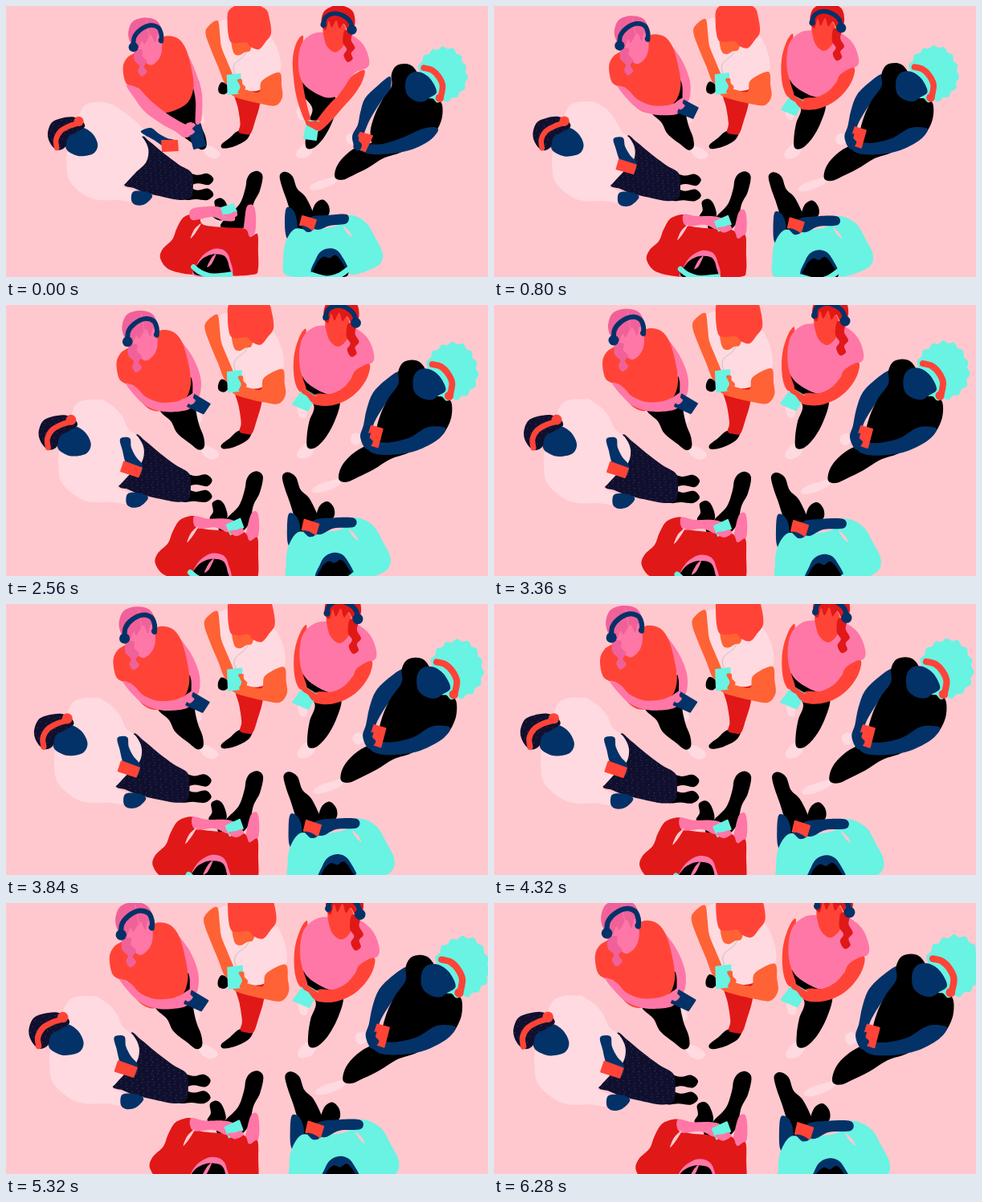
Recreate the animation shown at these times as an HTML page with a canvas. Size 600 by 338 pixels, loop 6320 ms.

```html
<!DOCTYPE html>
<html lang="en">
<head>
<meta charset="utf-8">
<title>Circle of friends</title>
<style>
html, body { margin: 0; width: 100%; height: 100%; overflow: hidden; background: #ffc8ce; }
canvas { display: block; width: 100vw; height: 100vh; }
</style>
</head>
<body>
<canvas id="stage" width="600" height="338"></canvas>
<script>
const ctx = document.getElementById('stage').getContext('2d');
const LOOP = 6320, STEP = 40, MID = 3.36, SPAN = 2.92;
const BG = '#ffc8ce', BLUSH = '#ffdae0', CORAL = '#ff4437', ORANGE = '#ff6234',
  RED = '#e11818', PINK = '#ff77a6', ROSE = '#f0619a', NAVY = '#033268',
  INK = '#10102e', AQUA = '#68f3e3', BLACK = '#000';

let fig, raise; // current figure, progress of the arms (0..1)

const read = s => s.trim().split(/\s+/).map(p => p.split(',').map(Number));

// Stage position at the start of the loop -> figure space
function settle([x, y]) {
  const u = -MID / SPAN, s = 1 + fig.zoom * u;
  return [fig.x + (x - fig.x - fig.dx * u) / s, fig.y + (y - fig.y - fig.dy * u) / s];
}

function points(end, start) {
  const b = read(end);
  if (!start) return b;
  const a = read(start).map(settle);
  return b.map((p, i) => p.map((v, j) => a[i][j] + (v - a[i][j]) * raise));
}

function trace(p, closed) {
  const n = p.length;
  const at = i => closed ? p[(i + n) % n] : p[Math.max(0, Math.min(n - 1, i))];
  ctx.beginPath();
  ctx.moveTo(...p[0]);
  for (let i = 0; i < (closed ? n : n - 1); i++) {
    const [a, b, c, d] = [at(i - 1), at(i), at(i + 1), at(i + 2)];
    ctx.bezierCurveTo(b[0] + (c[0] - a[0]) / 6, b[1] + (c[1] - a[1]) / 6,
      c[0] - (d[0] - b[0]) / 6, c[1] - (d[1] - b[1]) / 6, c[0], c[1]);
  }
}

function blob(color, end, start) {
  trace(points(end, start), true);
  ctx.fillStyle = color;
  ctx.fill();
}

function line(color, width, pts) {
  trace(read(pts), false);
  ctx.strokeStyle = color;
  ctx.lineWidth = width;
  ctx.stroke();
}

function dot(color, x, y, r) {
  ctx.beginPath();
  ctx.arc(x, y, r, 0, 7);
  ctx.fillStyle = color;
  ctx.fill();
}

function phone(color, end, start) {
  ctx.beginPath();
  points(end, start).forEach(p => ctx.lineTo(...p));
  ctx.closePath();
  ctx.fillStyle = ctx.strokeStyle = color;
  ctx.lineWidth = 2;
  ctx.fill();
  ctx.stroke();
}

function speckled(pts, count) {
  blob(INK, pts);
  const p = read(pts), xs = p.map(q => q[0]), ys = p.map(q => q[1]);
  const x0 = Math.min(...xs), y0 = Math.min(...ys);
  const w = Math.max(...xs) - x0, h = Math.max(...ys) - y0;
  ctx.save();
  ctx.clip();
  for (let i = 1; i <= count; i++) {
    dot('#3c4674', x0 + w * (i * 0.7549 % 1), y0 + h * (i * 0.5698 % 1), 0.55);
  }
  ctx.restore();
}

function curls(x, y, rx, ry) {
  ctx.beginPath();
  for (let i = 0; i < 180; i++) {
    const a = i * Math.PI / 90, k = 1 + 0.045 * Math.sin(a * 15) + 0.02 * Math.sin(a * 4);
    ctx.lineTo(x + rx * k * Math.cos(a), y + ry * k * Math.sin(a));
  }
  ctx.fillStyle = AQUA;
  ctx.fill();
}

// x, y: feet; dx, dy: drift and zoom: growth over SPAN seconds
const figures = [
  { x: 256, y: 219, dx: -2, dy: 3, zoom: 0.05, draw() {
    blob(BLACK, '218,211 235,214 248,212 256,219 250,227 235,225 218,228');
    blob(BLACK, '218,230 235,234 249,232 256,240 248,247 233,246 218,246');
    speckled('160,162 172,170 190,185 210,200 227,211 229,230 226,244 212,247 190,243 165,237 150,231 138,226 148,205 158,188', 260);
    blob(BLUSH, '84,124 96,118 113,118 130,125 143,139 150,154 163,165 170,180 167,197 153,211 141,224 137,229 151,236 150,249 130,247 104,247 85,240 66,222 62,200 63,182 70,165 76,142');
    blob(NAVY, '149,237 160,235 172,238 175,243 166,252 155,254 148,249');
    blob(BLUSH, '113,118 130,126 145,145 153,166 141,168 130,158 115,150',
      '118,122 146,132 168,150 176,160 165,163 150,158 130,155');
    blob(NAVY, '140,167 152,166 154,178 160,190 168,200 166,212 158,212 150,205 146,195 143,182',
      '168,156 180,152 190,159 201,165 211,168 212,177 203,180 194,174 184,167 173,161');
    phone(CORAL, '145,196 167,204 163,215 141,208', '194,168 213,168 214,180 195,181');
    blob(NAVY, '62,160 80,151 95,158 103,173 98,185 82,189 70,186 61,178');
    speckled('37,160 42,145 54,139 70,137 82,142 86,150 76,157 64,164 60,177 50,181 41,173', 45);
    line(CORAL, 7, '49,178 48,167 54,156 66,149 79,145');
    dot(CORAL, 78, 143, 6.5);
  } },
  { x: 262, y: 189, dx: -2, dy: 2, zoom: 0.057, draw() {
    blob(BLUSH, '233,132 240,133 244,142 240,147 234,145');
    blob(BLUSH, '240,177 250,176 260,181 265,188 257,193 247,189');
    blob(BLACK, '190,128 204,145 212,160 228,173 239,181 246,177 245,164 239,148 235,125 238,100 232,86 218,108');
    blob(PINK, '213,40 228,58 238,78 242,95 240,112 232,114 231,95 226,80 219,60',
      '214,46 227,62 237,85 244,110 243,143 236,146 236,118 231,95 222,70');
    blob(CORAL, '150,52 140,59 135,71 138,90 146,97 158,101 168,122 184,132 205,128 222,117 229,97 226,72 219,47 209,33 195,29 182,34');
    blob(PINK, '147,97 160,102 172,114 190,121 210,120 225,115 233,121 226,130 208,133 190,132 172,125 158,112',
      '150,99 165,103 180,118 200,134 218,145 229,151 232,160 222,164 210,156 192,146 172,131 160,115');
    phone(NAVY, '233,111 253,123 245,135 225,126', '227,152 242,148 248,174 234,178');
    blob(PINK, '222,117 230,110 234,108 232,115 235,119 229,124', '222,150 229,145 236,148 232,153 235,157 228,161');
    blob(PINK, '154,36 165,24 182,26 187,42 184,58 173,68 163,62 157,50');
    blob(ROSE, '142,27 147,11 161,5 177,7 185,16 187,32 181,27 178,38 172,28 164,40 160,36 155,46 147,42');
    line(PINK, 1, '166,8 168,18 170,30');
    blob(ROSE, '151,48 161,48 161,56 167,63 163,70 167,77 160,83 155,76 157,69 150,61');
    line(NAVY, 6, '149,43 150,31 158,21 171,15 182,18 186,27 186,36');
    dot(NAVY, 149, 44, 6.5);
    dot(NAVY, 185, 35, 3);
  } },
  { x: 270, y: 178, dx: 0, dy: 2, zoom: 0.055, draw() {
    blob(BLACK, '264,99 268,92 275,95 277,103 272,108 265,106');
    blob(BLACK, '306,156 302,168 286,177 271,180 268,175 279,166 290,157');
    blob(RED, '285,103 303,101 321,98 319,122 313,143 307,160 299,161 291,158 293,147 290,126');
    blob(BLUSH, '262,16 274,8 290,12 328,28 339,40 346,60 346,78 336,83 323,89 321,101 306,104 291,99 280,82 270,52 264,32');
    blob(ORANGE, '263,10 251,17 247,27 254,48 264,72 272,92 280,95 284,86 276,65 268,45 266,28');
    blob(ORANGE, '322,90 345,79 348,97 349,112 340,123 322,121 300,116 285,111 279,104 286,99 300,102 318,105');
    line('#aebcc5', 0.8, '302,50 297,58 287,66 284,73 286,82');
    phone(AQUA, '276,83 293,81 294,106 277,108');
    blob(ORANGE, '289,89 295,88 296,94 300,99 296,107 290,106 293,98');
    blob(ORANGE, '282,34 298,34 308,38 306,50 299,52 291,56 284,52');
    blob(CORAL, '276,14 279,-5 302,-14 326,-6 332,8 334,27 327,38 318,48 307,45 301,39 287,40 279,36');
  } },
  { x: 370, y: 186, dx: 1.5, dy: 1.5, zoom: 0.06, draw() {
    blob(BLUSH, '363,127 369,123 375,130 373,140 366,139');
    blob(BLUSH, '375,172 385,176 381,187 371,192 363,190 364,182');
    blob(BLACK, '363,86 369,105 384,125 378,145 375,164 376,178 386,178 399,165 410,145 417,121 410,105 385,95');
    blob(CORAL, '374,28 367,35 360,55 358,75 360,95 366,107 374,104 370,90 367,72 372,50',
      '370,38 362,45 357,65 358,90 362,115 372,143 380,146 375,125 370,100 367,70');
    blob(PINK, '372,35 388,24 410,24 432,25 449,36 458,52 459,69 442,77 432,88 425,104 406,111 387,104 372,92 366,75 366,52');
    blob(CORAL, '437,80 454,72 452,88 441,105 425,118 405,125 386,124 378,117 388,110 405,110 420,103 430,92',
      '430,88 446,80 443,95 433,111 418,128 405,143 390,156 381,152 390,138 403,122 413,112 422,100');
    phone(AQUA, '371,104 386,113 376,131 357,123', '375,143 389,144 386,167 371,165');
    blob(CORAL, '365,99 373,104 380,109 388,115 382,121 375,113 369,109', '373,141 379,144 385,143 393,147 388,155 381,152 374,148');
    blob(CORAL, '399,16 412,4 427,14 429,29 425,42 415,50 405,44 400,32');
    blob(RED, '396,13 400,-5 418,-13 437,-6 441,12 434,25 426,12 420,18 416,7 410,17 406,8 402,20');
    blob(RED, '427,21 437,23 436,34 441,44 436,51 438,59 431,63 426,54 430,46 425,37');
    line(NAVY, 6, '399,12 402,3 414,-2 427,2 435,10 437,21');
    dot(NAVY, 437, 20, 6.5);
    dot(NAVY, 399, 13, 4);
  } },
  { x: 387, y: 230, dx: 4, dy: 5, zoom: 0.055, draw() {
    blob(BLUSH, '431,164 439,160 446,167 439,175 432,172');
    blob(BLUSH, '382,232 391,225 407,220 421,216 416,226 401,233 387,236');
    blob(BLACK, '470,172 500,170 530,165 506,184 481,193 460,206 440,216 426,222 416,219 418,205 428,191 446,178');
    blob(NAVY, '493,82 476,92 459,109 451,130 447,150 443,165 450,180 462,178 456,169 459,151 467,135 480,116 493,100',
      '478,88 462,100 447,115 441,133 438,148 431,163 436,178 447,180 444,167 448,153 455,138 467,119 478,105');
    blob(BLACK, '491,82 498,70 513,68 524,77 535,104 549,113 558,121 558,140 550,158 540,165 515,166 496,178 470,181 463,161 468,138 478,117 491,98');
    blob(NAVY, '551,156 540,169 515,182 490,187 465,187 453,181 459,172 480,172 505,166 527,153 545,152',
      '538,155 527,168 505,179 480,184 457,185 443,181 449,173 469,172 494,164 516,154 531,151');
    phone(CORAL, '457,151 471,155 465,178 450,173', '441,158 456,162 447,181 433,176');
    blob(NAVY, '451,162 456,160 455,166 459,171 454,178 449,174', '434,164 439,163 439,168 443,173 440,180 433,177');
    curls(559, 82, 32, 36);
    blob(NAVY, '510,90 517,80 530,79 543,88 551,105 541,113 533,118 521,116 511,107');
    line(CORAL, 8, '534,73 545,76 554,85 559,97 556,114');
    dot(CORAL, 555, 113, 5.5);
  } },
  { x: 312, y: 209, dx: 0, dy: 2, zoom: 0.056, draw() {
    blob(BLACK, '256,248 264,244 271,250 275,266 265,274 253,268 257,259');
    blob(BLACK, '304,211 313,208 320,215 316,235 308,251 302,275 286,288 264,282 275,267 290,251 297,231 299,219');
    blob(PINK, '305,262 312,259 315,270 314,290 305,302 297,297 300,280',
      '300,250 308,249 311,262 310,282 302,289 296,283 297,267');
    blob(RED, '216,269 235,265 240,279 268,283 296,285 303,296 313,292 314,315 314,338 308,346 272,346 270,325 252,321 236,336 230,346 197,340 184,325 187,312 200,299 206,284');
    blob(PINK, '233,265 250,268 272,268 285,272 288,285 275,285 260,279 236,280',
      '230,254 250,250 268,251 280,256 285,267 272,268 256,263 232,267');
    blob(BG, '238,278 229,286 224,298 231,290');
    phone(AQUA, '274,276 291,268 295,279 279,288', '268,252 283,247 287,257 272,263');
    blob(PINK, '277,284 287,282 293,280 296,285 286,290', '270,261 279,259 285,256 288,261 279,266');
    blob(PINK, '231,336 240,321 255,312 269,314 276,325 277,348 230,348');
    blob(BLACK, '230,346 236,329 247,321 258,319 270,322 275,334 274,348');
    blob(PINK, '246,336 252,324 258,319 252,332');
    line(AQUA, 7, '228,336 237,343 253,348 277,346');
  } },
  { x: 351, y: 211, dx: 4, dy: 2, zoom: 0.055, draw() {
    blob(BLACK, '392,252 402,246 410,254 410,266 398,274 388,268');
    blob(BLACK, '345,214 352,209 362,215 368,231 379,242 389,262 394,278 372,288 362,270 354,246 348,229');
    blob(NAVY, '353,262 361,263 367,275 367,293 358,306 352,299 351,280',
      '349,252 357,254 362,267 362,283 355,294 349,288 347,270');
    blob(AQUA, '353,302 365,285 385,286 420,281 430,268 445,268 461,278 472,297 481,315 480,329 468,338 442,346 433,338 426,321 411,313 396,320 390,346 353,346 350,322');
    blob(NAVY, '435,267 436,278 410,280 392,288 378,281 385,270 405,267',
      '424,260 424,271 403,274 388,279 374,273 380,263 398,261');
    blob(BG, '429,281 437,288 441,296 434,290');
    phone(CORAL, '373,269 391,275 387,288 370,282', '369,262 386,267 382,279 366,273');
    blob(NAVY, '371,283 378,284 386,289 379,291 374,287', '367,274 373,275 381,280 375,282 370,278');
    blob(NAVY, '389,346 393,325 401,314 414,311 426,319 435,346');
    blob(BLACK, '391,348 394,331 403,322 411,324 419,320 428,330 434,348');
    line(AQUA, 7, '388,346 408,351 424,347 437,338');
  } }
];

function frame(now) {
  const t = Math.floor(now % LOOP / STEP) * STEP / 1000;
  const u = (t - MID) / SPAN, k = Math.min(1, t);
  raise = k * k * (3 - 2 * k);
  ctx.setTransform(1, 0, 0, 1, 0, 0);
  ctx.fillStyle = BG;
  ctx.fillRect(0, 0, 600, 338);
  ctx.lineCap = ctx.lineJoin = 'round';
  for (fig of figures) {
    const s = 1 + fig.zoom * u;
    ctx.setTransform(s, 0, 0, s, fig.x * (1 - s) + fig.dx * u, fig.y * (1 - s) + fig.dy * u);
    fig.draw();
  }
}

const begin = performance.now();
(function tick() {
  frame(performance.now() - begin);
  requestAnimationFrame(tick);
})();
</script>
</body>
</html>
```
